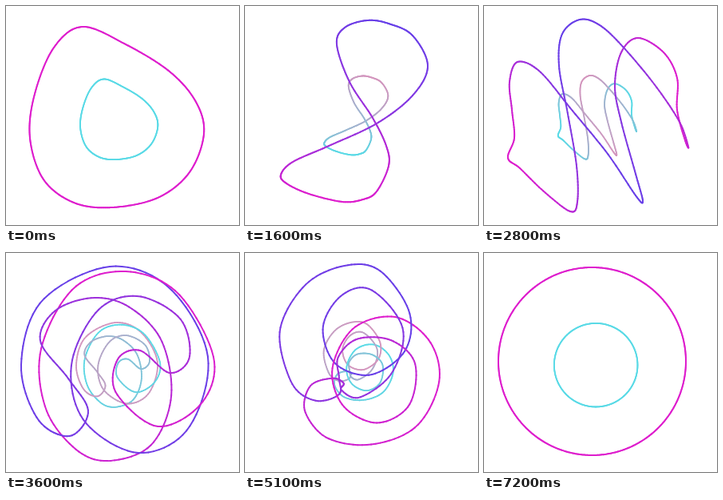
An HTML page with a canvas that plays this animation: 292 by 274 pixels, repeating every 7300 ms.

```html
<!DOCTYPE html>
<html>
<head>
<meta charset="utf-8">
<style>
  html, body { margin: 0; width: 100%; height: 100%; overflow: hidden; background: #fff; }
  canvas { display: block; }
</style>
</head>
<body>
<canvas id="stage" width="292" height="274"></canvas>
<script>
const ctx = document.getElementById('stage').getContext('2d');
const LOOP = 7300, STEP = 100, SAMPLES = 400, CENTER = 139;
const lerp = (a, b, k) => a + (b - a) * k;

// Closed Catmull-Rom spline through flat x,y pairs
function spline(flat) {
  const n = flat.length / 2;
  const at = (i, axis) => flat[2 * ((i + n) % n) + axis];
  return Array.from({ length: SAMPLES }, (_, s) => {
    const u = s / SAMPLES * n, i = Math.floor(u), f = u - i;
    return [0, 1].map(axis => {
      const a = at(i - 1, axis), b = at(i, axis), c = at(i + 1, axis), d = at(i + 2, axis);
      return b + f / 2 * (c - a + f * (2 * a - 5 * b + 4 * c - d + f * (3 * (b - c) + d - a)));
    });
  });
}

function circle(c, r, start) {
  return Array.from({ length: SAMPLES }, (_, s) => {
    const a = start + s / SAMPLES * 2 * Math.PI;
    return [c + r * Math.cos(a), c + r * Math.sin(a)];
  });
}

const reach = pts => Math.max(...pts.map(([x, y]) => Math.hypot(x - CENTER, y - CENTER)));

// cycles: colour waves along the curve; origin, scale: mapping to the small copy
const pose = (time, cycles, pts, origin = 139, scale = 0.435) =>
  ({ time, cycles, pts, origin, scale, reach: reach(pts) });

const poses = [
  pose(0, 0, spline([133,252, 85,246, 47,217, 30,165, 36,110, 60,52, 96,26, 150,48,
    205,82, 238,120, 248,160, 230,208, 190,240]), 135.5, 0.445),
  pose(1600, 1, spline([122,245, 80,235, 52,222, 45,211, 60,195, 105,175, 165,147, 210,112,
    229,75, 210,37, 180,22, 153,18, 125,27, 115,48, 131,95, 160,140, 177,175, 180,200,
    165,232, 148,242])),
  pose(2800, 2, spline([30,190, 38,165, 35,130, 32,95, 42,70, 70,82, 110,130, 155,185, 190,237,
    199,244, 190,210, 172,145, 164,100, 172,58, 193,40, 225,58, 242,90, 242,130, 252,168,
    256,176, 245,145, 215,100, 175,52, 145,24, 120,17, 98,35, 94,75, 105,135, 116,200,
    117,245, 108,257, 75,232, 45,203])),
  pose(3600, 1, spline([150,23, 85,44, 44,120, 50,195, 88,246, 130,260, 182,240, 207,180,
    195,110, 155,68, 110,56, 62,72, 43,110, 78,157, 103,198, 80,229, 40,208, 19,140, 45,60,
    130,17, 205,44, 253,130, 228,220, 165,250, 98,210, 82,140, 115,72, 165,54, 218,82,
    230,130, 205,150, 168,122, 140,133, 138,175, 190,217, 245,188, 260,130, 215,50])),
  pose(4400, 1, spline([135,17, 205,52, 231,120, 200,197, 130,224, 68,203, 46,145, 68,91,
    107,84, 122,108, 106,140, 130,176, 180,152, 190,90, 118,36, 55,64, 22,140, 55,223,
    140,251, 228,205, 255,125, 215,40, 165,25, 100,54, 62,130, 95,211, 150,229, 198,205,
    190,165, 172,120, 190,84, 235,90, 259,140, 225,226, 140,261, 55,223, 20,140, 55,50])),
  pose(6000, 1, spline([245,175, 238,205, 205,230, 150,247, 113,258, 125,235, 150,195, 180,142,
    203,85, 207,52, 190,27, 150,21, 110,26, 70,37, 40,68, 20,115, 25,138, 60,146, 110,141,
    160,133, 205,135, 235,152])),
  pose(7200, 0, circle(135.5, 117.5, 0.35), 135.5, 0.445)
];

const tint = (cycles, s) => (1 - Math.cos(2 * Math.PI * cycles * s / SAMPLES)) / 2;

function stroke(pts, mix, from, to, width) {
  ctx.lineWidth = width;
  ctx.lineCap = 'round';
  pts.forEach(([x, y], s) => {
    const [nx, ny] = pts[(s + 1) % SAMPLES];
    ctx.strokeStyle = `rgb(${from.map((c, i) => Math.round(lerp(c, to[i], mix[s])))})`;
    ctx.beginPath();
    ctx.moveTo(x, y);
    ctx.lineTo(nx, ny);
    ctx.stroke();
  });
}

function draw(time) {
  let i = poses.length - 2;
  while (i > 0 && poses[i].time > time) i--;
  const a = poses[i], b = poses[i + 1];
  const k = Math.min(1, (time - a.time) / (b.time - a.time));

  // Blend the shapes, then restore the overall size
  let pts = a.pts.map((p, s) => p.map((v, axis) => lerp(v, b.pts[s][axis], k)));
  const grow = lerp(a.reach, b.reach, k) / reach(pts);
  pts = pts.map(p => p.map(v => CENTER + (v - CENTER) * grow));
  const mix = pts.map((_, s) => lerp(tint(a.cycles, s), tint(b.cycles, s), k));

  const origin = lerp(a.origin, b.origin, k), scale = lerp(a.scale, b.scale, k);
  const inner = pts.map(p => p.map(v => 140.2 + (v - origin) * scale));

  ctx.fillStyle = '#fff';
  ctx.fillRect(0, 0, 292, 274);
  stroke(inner, mix, [90, 218, 230], [212, 150, 190], 1.8);
  stroke(pts, mix, [222, 30, 205], [104, 64, 232], 2);
}

let shown = -1;
function tick() {
  const time = Math.floor(performance.now() % LOOP / STEP) * STEP;
  if (time !== shown) draw(shown = time);
  requestAnimationFrame(tick);
}
tick();
</script>
</body>
</html>
```
